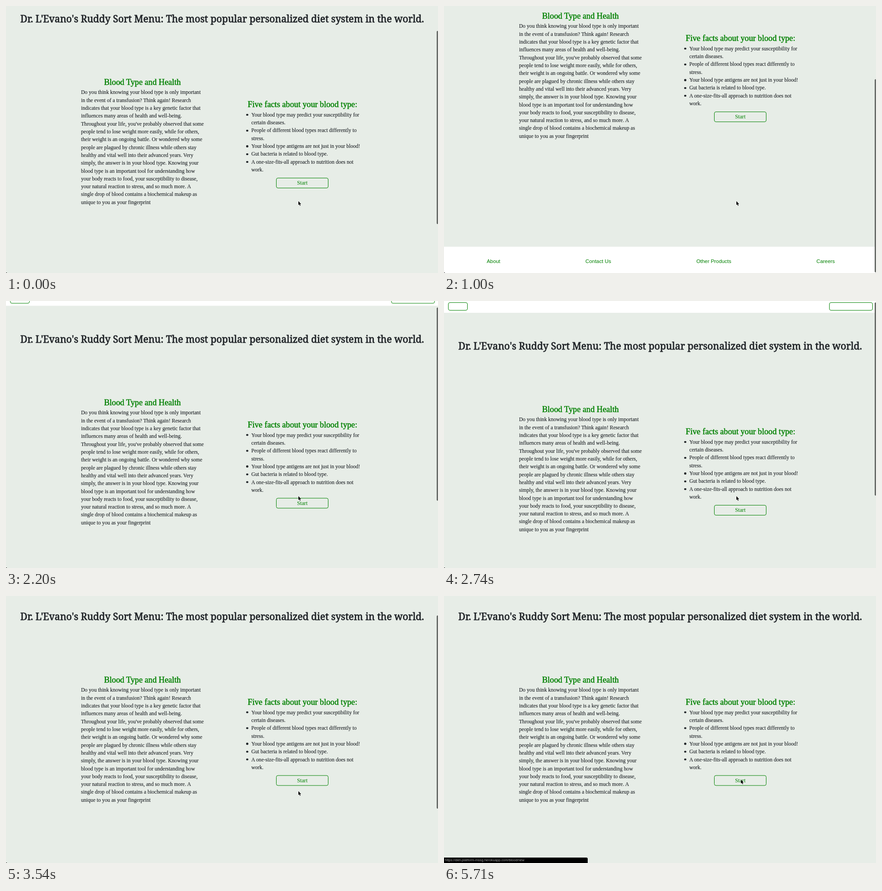
These frames come from a looping animation (950x589 px, 8000 ms). An HTML page:

```html
<!DOCTYPE html>
<html lang="en">
<head>
<meta charset="utf-8">
<title>Diet landing page</title>
<style>
  html, body { margin: 0; width: 100%; height: 100%; overflow: hidden; }
  #stage { position: relative; width: 950px; height: 589px; overflow: hidden; background: #e7ede7; color: #212529; }
  #stage div, h1, h2, p, ul, a, svg { position: absolute; margin: 0; padding: 0; white-space: nowrap; }
  #page { inset: 0; font: 11.6px/17.32px "Liberation Serif", "Times New Roman", serif; }
  h1, h2 { transform: translate(-50%, -50%); line-height: 1.2; }
  h1 { left: 475.5px; top: 27.5px; font: 500 21.18px/1.2 "Noto Serif", serif; -webkit-text-stroke: .8px; }
  h2 { font-size: 18.2px; font-weight: 400; color: green; -webkit-text-stroke: .5px; }
  p, ul { -webkit-text-stroke: .15px; }
  p { left: 165px; top: 182.4px; }
  ul { left: 539.5px; top: 231.8px; font-size: 11.55px; list-style: none; }
  li { position: relative; }
  li::before { content: ""; position: absolute; left: -11.5px; top: 6.2px; width: 4.5px; height: 4.5px; border-radius: 50%; background: #212529; }
  .button { box-sizing: border-box; border: 1px solid green; border-radius: 4px; color: green; text-align: center; }
  #start { left: 594px; top: 379px; width: 115px; height: 23px; font-size: 12.3px; line-height: 21px; }
  #nav { left: 0; top: -71px; width: 950px; height: 26px; background: #fff; }
  #nav .button { top: 3px; height: 18px; }
  #footer { left: 0; top: 677px; width: 950px; height: 60px; background: #fff; font: 11.4px/14px "Liberation Sans", Arial, sans-serif; }
  #footer a { top: 25px; color: green; }
  #thumb { left: 946.5px; top: 55px; width: 5px; height: 426px; border-radius: 2px; background: #6d706d; }
  #status { left: 0; top: 577px; width: 316px; height: 12px; border-radius: 0 3px 0 0; background: #000; color: #a0a0a0;
    font: 7.5px/12px "Liberation Sans", Arial, sans-serif; text-indent: 2px; }
  #corner { left: 0; top: 588px; width: 2px; height: 1px; background: #222; }
  #cursor { left: 0; top: 0; overflow: visible; }
</style>
</head>
<body>
<div id="stage">
  <div id="page">
    <div id="nav">
      <div class="button" style="left:9px;width:43px"></div>
      <div class="button" style="left:847px;width:96px"></div>
    </div>
    <h1>Dr. L'Evano's Ruddy Sort Menu: The most popular personalized diet system in the world.</h1>
    <h2 style="left:300px;top:168.5px">Blood Type and Health</h2>
    <p>Do you think knowing your blood type is only important<br>
      in the event of a transfusion? Think again! Research<br>
      indicates that your blood type is a key genetic factor that<br>
      influences many areas of health and well-being.<br>
      Throughout your life, you've probably observed that some<br>
      people tend to lose weight more easily, while for others,<br>
      their weight is an ongoing battle. Or wondered why some<br>
      people are plagued by chronic illness while others stay<br>
      healthy and vital well into their advanced years. Very<br>
      simply, the answer is in your blood type. Knowing your<br>
      blood type is an important tool for understanding how<br>
      your body reacts to food, your susceptibility to disease,<br>
      your natural reaction to stress, and so much more. A<br>
      single drop of blood contains a biochemical makeup as<br>
      unique to you as your fingerprint</p>
    <h2 style="left:652px;top:217.5px">Five facts about your blood type:</h2>
    <ul>
      <li>Your blood type may predict your susceptibility for<br>certain diseases.</li>
      <li>People of different blood types react differently to<br>stress.</li>
      <li>Your blood type antigens are not just in your blood!</li>
      <li>Gut bacteria is related to blood type.</li>
      <li>A one-size-fits-all approach to nutrition does not<br>work.</li>
    </ul>
    <div class="button" id="start">Start</div>
    <div id="footer">
      <a style="left:94px">About</a>
      <a style="left:311px">Contact Us</a>
      <a style="left:555px">Other Products</a>
      <a style="left:819px">Careers</a>
    </div>
  </div>
  <div id="thumb"></div>
  <div id="status">https://diet-platform-mssg.herokuapp.com/blood/new</div>
  <div id="corner"></div>
  <svg id="cursor" width="7" height="12">
    <path d="M0 0V8.6L2 6.9 3.4 10.2 4.8 9.6 3.4 6.4H6Z" stroke="#fff" stroke-width=".9" paint-order="stroke"/>
  </svg>
</div>
<script>
  const LOOP = 8000;
  const THUMB_RATIO = 0.73;

  // Each track holds [start ms, values...]; values hold until the next start.
  const scroll = [[0, 0], [180, -40], [470, -112], [740, -147], [1000, -146], [1300, -133], [1600, -78.5], [1900, -6],
    [2200, 55.5], [2470, 70], [2740, 71], [3010, 44], [3270, 28], [3540, 16.5]];
  const pointer = [[0, 643, 430.5], [3780, 643, 430], [4010, 645, 405], [4930, 645, 405.5], [5230, 648, 405],
    [5380, 651, 405], [5560, 652, 405], [5710, 653, 405]];
  const thumbFade = [[0, 1], [4010, .5], [4160, 0]];
  const statusFade = [[0, 0], [5080, .6], [5230, 1]];

  const at = (track, t) => track.findLast(key => key[0] <= t).slice(1);
  const style = id => document.getElementById(id).style;
  const page = style("page"), thumb = style("thumb"), statusBar = style("status"), cursor = style("cursor");

  function draw(now) {
    const t = now % LOOP;
    const [y] = at(scroll, t);
    const [px, py] = at(pointer, t);
    page.transform = `translateY(${y}px)`;
    thumb.transform = `translateY(${-y * THUMB_RATIO}px)`;
    thumb.opacity = at(thumbFade, t)[0];
    statusBar.opacity = at(statusFade, t)[0];
    cursor.transform = `translate(${px}px, ${py}px)`;
    requestAnimationFrame(draw);
  }
  draw(performance.now());
</script>
</body>
</html>
```
